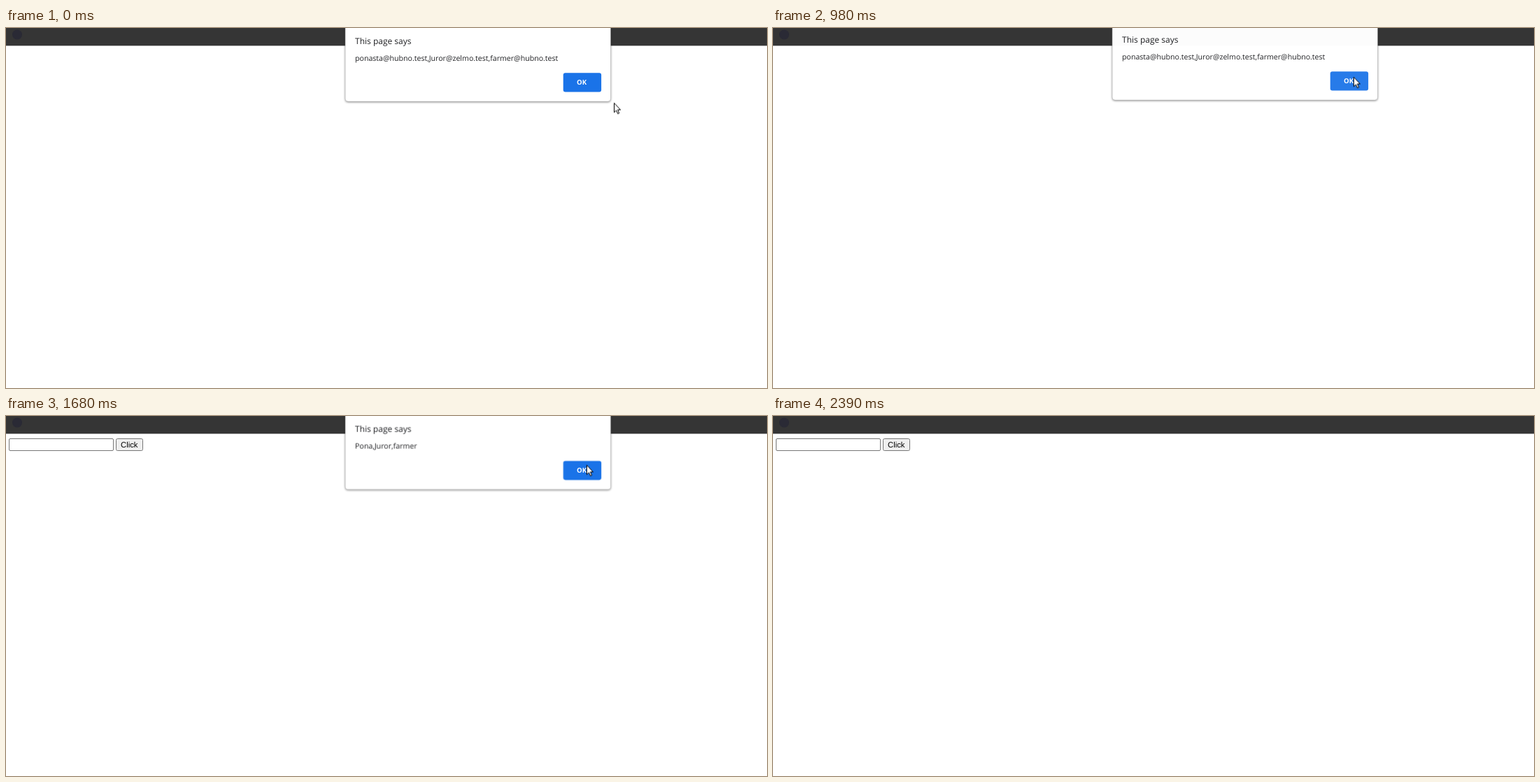
An HTML page that plays this animation: 1088x515 px, repeating every 3.34 s.

```html
<!DOCTYPE html>
<html lang="en">
<head>
<meta charset="utf-8">
<title>Alert dialogs</title>
<style>
  html, body { margin: 0; width: 100%; height: 100%; overflow: hidden; background: #fff; }
  svg { display: block; width: 1088px; height: 515px; }
  text { text-rendering: geometricPrecision; }

  .dialog { font-family: "Open Sans", "Noto Sans", sans-serif; fill: #202124; transform-origin: 675px 50px; }
  .panel { fill: #fff; stroke: #b4b4b4; stroke-width: .5; filter: drop-shadow(0 1px 1.5px rgba(0, 0, 0, .45)); }
  .title { font-size: 12px; }
  .message { font-size: 10.6px; }
  .ok { font-size: 9.6px; font-weight: 700; fill: #fff; }
  .button { fill: #1a73e8; }

  .field { fill: #fff; stroke: #767676; }
  .click { fill: #efefef; stroke: #767676; }
  .label { font: 11.3px "Liberation Sans", Arial, sans-serif; fill: #000; }
  .cursor { fill: #fff; stroke: #000; stroke-width: 1; stroke-linejoin: miter; }

  /* All changes are hard cuts on one 3340 ms clock */
  .first, .second, .first .button, .second .button, .ring, .form, .cursor {
    animation: 3340ms step-end infinite;
  }
  .first { animation-name: first; }
  .second { animation-name: second; }
  .first .button { animation-name: hover; }
  .second .button { animation-name: release; }
  .ring { animation-name: ring; }
  .form { animation-name: form; }
  .cursor { animation-name: pointer; }

  @keyframes first {
    0% { opacity: 1; transform: none; }
    29.34% { opacity: .99; transform: translateY(-2px); }
    31.43% { opacity: .96; transform: translateY(-7px); }
    33.53%, 100% { opacity: 0; transform: translateY(-16px); }
  }
  @keyframes second {
    0% { opacity: 0; transform: none; }
    31.43% { opacity: .14; transform: translateY(-10px) scale(1.005); }
    33.53% { opacity: .92; transform: translateY(-2px); }
    35.92% { opacity: 1; transform: none; }
    52.99% { opacity: .6; transform: translateY(-7px); }
    55.08% { opacity: .015; transform: translateY(-16px); }
    57.48%, 100% { opacity: 0; transform: none; }
  }
  @keyframes hover {
    0% { fill: #1a73e8; }
    14.97% { fill: #2277e8; }
    26.94%, 100% { fill: #257ae9; }
  }
  @keyframes release {
    0% { fill: #2b7de9; }
    47.6%, 100% { fill: #1a73e8; }
  }
  @keyframes ring {
    0% { opacity: 1; }
    47.6%, 100% { opacity: 0; }
  }
  @keyframes form {
    0% { opacity: 0; }
    50.29%, 100% { opacity: 1; }
  }
  @keyframes pointer {
    0% { transform: translate(869px, 106.5px); opacity: 1; }
    5.38% { transform: translate(873px, 106px); }
    7.78% { transform: translate(871px, 103px); }
    10.17% { transform: translate(864px, 96px); }
    12.57% { transform: translate(852px, 86px); }
    14.97% { transform: translate(840px, 77px); }
    17.06% { transform: translate(833px, 72px); }
    19.46% { transform: translate(829.8px, 69.5px); }
    57.48% { transform: translate(850px, 110px); }
    59.58% { transform: translate(945px, 292px); }
    61.97% { transform: translate(1031px, 459px); }
    64.97% { transform: translate(1036px, 495px); }
    69.46% { transform: translate(1043px, 506px); opacity: 1; }
    71.55%, 100% { transform: translate(1043px, 506px); opacity: 0; }
  }
</style>
</head>
<body>
<svg viewBox="0 0 1088 515">
  <rect width="1088" height="25.4" fill="#353535"/>
  <circle cx="16" cy="9.5" r="7" fill="#2a2a35"/>

  <g class="form">
    <rect class="field" x="4.5" y="32.5" width="149" height="17" rx="1.5"/>
    <rect class="click" x="157.5" y="32.5" width="38" height="17" rx="2"/>
    <text class="label" x="164" y="45">Click</text>
  </g>

  <g class="dialog first">
    <rect class="panel" x="485.1" y="-30" width="379.3" height="135" rx="4"/>
    <text class="title" x="499" y="22.5">This page says</text>
    <text class="message" x="499" y="46.5">ponasta@hubno.test,Juror@zelmo.test,farmer@hubno.test</text>
    <rect class="button" x="796.7" y="64.3" width="54.4" height="27.2" rx="3"/>
    <text class="ok" x="816" y="81.2">OK</text>
  </g>

  <g class="dialog second">
    <rect class="panel" x="485.1" y="-30" width="379.3" height="135" rx="4"/>
    <text class="title" x="499" y="22.5">This page says</text>
    <text class="message" x="499" y="46.5">Pona,Juror,farmer</text>
    <rect class="button" x="796.7" y="64.3" width="54.4" height="27.2" rx="3"/>
    <g class="ring" fill="none">
      <rect x="796.7" y="64.2" width="54.6" height="27.6" rx="3.5" stroke="#1a66d2" stroke-width="1.5"/>
      <rect x="798" y="65.5" width="52" height="25" rx="2.5" stroke="#fff"/>
    </g>
    <text class="ok" x="816" y="81.2">OK</text>
  </g>

  <path class="cursor" d="M.5 .8V14.2L3.5 11.4L5.7 16.2L7.7 15.3L5.6 10.6H9.6Z"/>
</svg>
</body>
</html>
```
